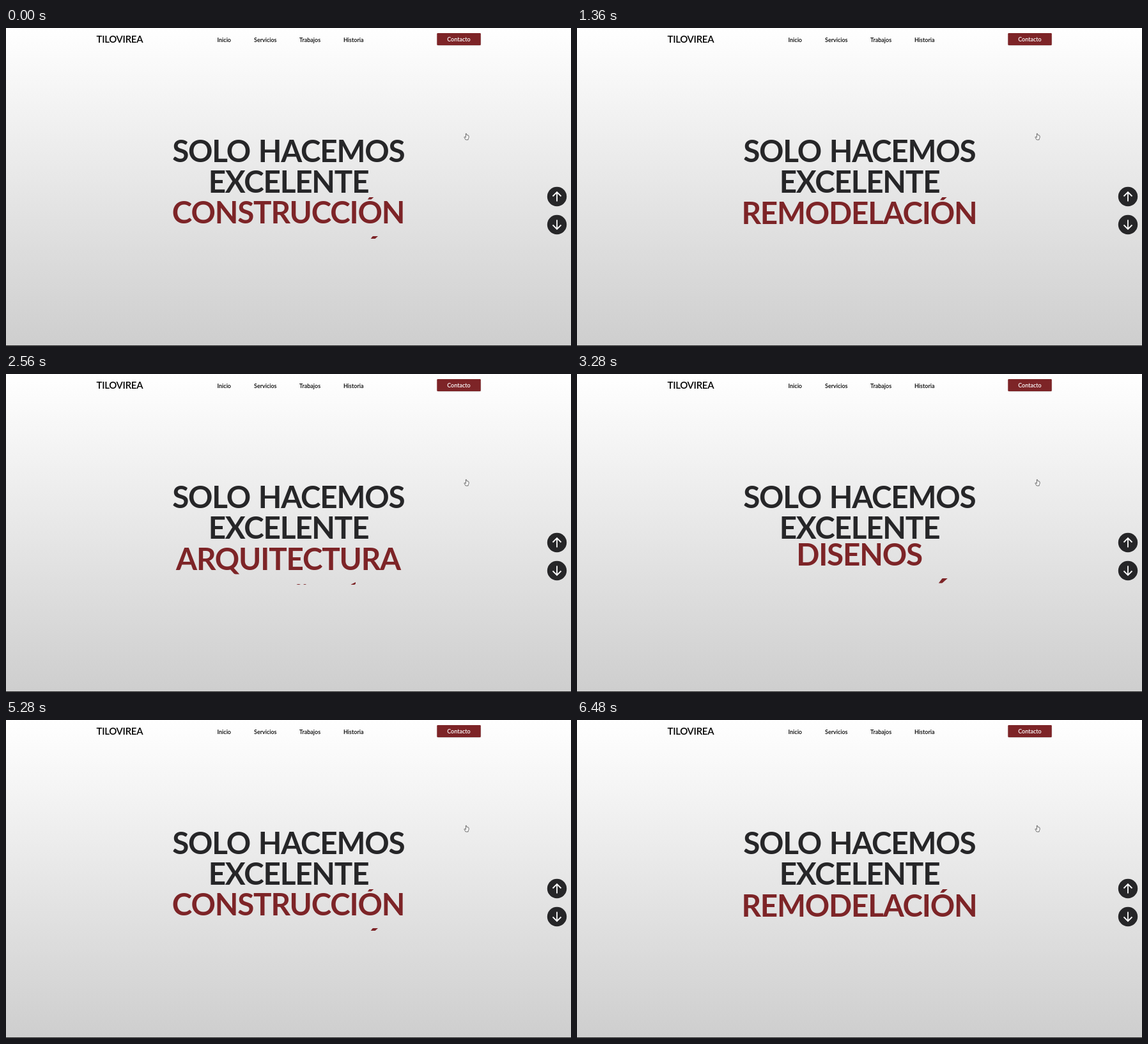
An HTML page that plays this animation: 884x498 px, repeating every 6.56 s.

```html
<!DOCTYPE html>
<html lang="es">
<head>
<meta charset="utf-8">
<title>Excelente construcción</title>
<style>
  html, body { margin: 0; width: 100%; height: 100%; overflow: hidden; }
  svg { display: block; width: 884px; height: 498px; }
  text { font-family: Lato, "Open Sans", sans-serif; }
  .brand { font-size: 15px; font-weight: 600; letter-spacing: -.3px; }
  .nav { font-size: 9px; font-weight: 600; }
  .big { font-size: 47.6px; font-weight: 700; letter-spacing: -1.2px; word-spacing: 2.5px; text-anchor: middle; }
</style>
</head>
<body>
<svg viewBox="0 0 884 498" xmlns="http://www.w3.org/2000/svg">
  <defs>
    <linearGradient id="sky" x2="0" y2="1">
      <stop offset="0" stop-color="#fff"/>
      <stop offset=".04" stop-color="#fdfdfd"/>
      <stop offset="1" stop-color="#cecece"/>
    </linearGradient>
    <clipPath id="slot"><rect x="200" y="265" width="484" height="65"/></clipPath>
    <filter id="soft" x="-10%" y="-30%" width="120%" height="180%"><feGaussianBlur stdDeviation="1"/></filter>
  </defs>
  <rect width="884" height="498" fill="url(#sky)"/>
  <rect y="497" width="884" height="1" fill="#262626"/>

  <text class="brand" x="141.5" y="22.5">TILOVIREA</text>
  <g class="nav">
    <text x="330.5" y="21.7">Inicio</text>
    <text x="388" y="21.7">Servicios</text>
    <text x="459" y="21.7">Trabajos</text>
    <text x="528" y="21.7">Historia</text>
  </g>
  <rect x="675" y="10" width="67.5" height="17.5" rx="2" opacity=".22" filter="url(#soft)"/>
  <rect x="674.3" y="8" width="68.5" height="19" rx="1.2" fill="#7d2427"/>
  <text class="nav" x="708.5" y="20.5" fill="#fff" text-anchor="middle">Contacto</text>

  <g class="big" fill="#262628">
    <text x="441.8" y="209.5">SOLO HACEMOS</text>
    <text x="442" y="258.3">EXCELENTE</text>
  </g>
  <g clip-path="url(#slot)"><g id="reel" class="big" fill="#7d2427"></g></g>

  <g id="arrow">
    <circle cx="862" cy="264" r="15.2" fill="#262628"/>
    <path d="M862 271.500V257.500M855.500 263.500L862 257L868.500 263.500" fill="none" stroke="#fff" stroke-width="1.8"/>
  </g>
  <use href="#arrow" transform="translate(0 572) scale(1 -1)"/>

  <path d="M719.400 165.400q.8-.6 1.200.3l.6 2.300 1.800-.1 1 .8.1 3-1 2v1.300h-3.900l-2.400-4q.2-1.100 1.500-.2l1.200.8z"
    fill="#fff" stroke="#333" stroke-width=".7"/>
</svg>
<script>
const LOOP = 6560, STEP = 80;
const TURN = 1225, START = 367;   // time per word, first turn
const PITCH = 64.7, OVER = 1.12, RISE = .4, BASE = 307.5;
const words = ["CONSTRUCCIÓN", "REMODELACIÓN", "ARQUITECTURA", "DISEÑOS"];
const NS = "http://www.w3.org/2000/svg";
const reel = document.getElementById("reel");

function add(parent, tag, attrs) {
  const el = document.createElementNS(NS, tag);
  for (const k in attrs) el.setAttribute(k, attrs[k]);
  return parent.appendChild(el);
}

const items = words.map(word => {
  const g = add(reel, "g", {});
  add(g, "text", { x: 441.5, y: BASE }).textContent = word;
  return g;
});
// stray accent beside the last word
add(items[3], "path", { d: "M547 262L540 265.500L537.500 270H540.500L547 264.500z" });

// cubic-bezier(.25, .1, .25, 1)
function ease(x) {
  const curve = (a, b, p) => 3 * a * p * (1 - p) ** 2 + 3 * b * p * p * (1 - p) + p ** 3;
  let lo = 0, hi = 1;
  for (let i = 0; i < 24; i++) {
    const mid = (lo + hi) / 2;
    if (curve(.25, .25, mid) < x) lo = mid; else hi = mid;
  }
  return curve(.1, 1, lo);
}

// reel position in words: rise past the stop, then sink back
function position(t) {
  const turn = (t - START) / TURN, n = Math.floor(turn), u = turn - n;
  return n + (u < RISE
    ? OVER * ease(u / RISE)
    : OVER - (OVER - 1) * ease((u - RISE) / (1 - RISE)));
}

function draw(ms) {
  const t = Math.floor((ms % LOOP) / STEP) * STEP;
  const pos = position(t), count = words.length;
  items.forEach((item, i) => {
    let d = ((i - pos) % count + count) % count;
    if (d > count / 2) d -= count;
    item.setAttribute("transform", `translate(0 ${(d * PITCH).toFixed(2)})`);
  });
}

let begin;
function tick(now) {
  begin ??= now;
  draw(now - begin);
  requestAnimationFrame(tick);
}
draw(0);
requestAnimationFrame(tick);
</script>
</body>
</html>
```
